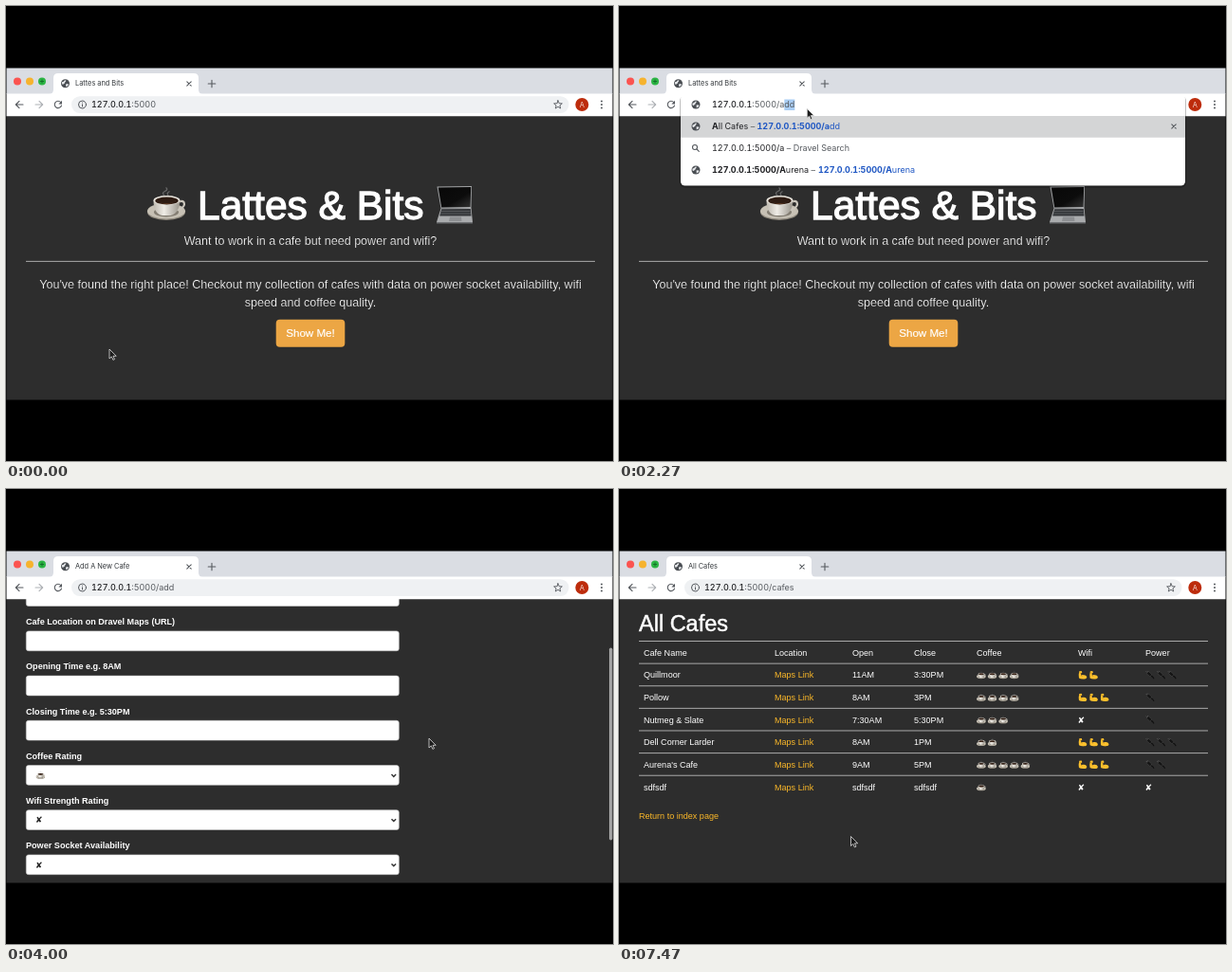
Recreate the animation shown at these times as an HTML page. Size 640 by 480 pixels, loop 8 s.

```html
<!DOCTYPE html>
<html lang="en">
<head>
<meta charset="utf-8">
<title>Cafe finder</title>
<style>
  html, body { margin: 0; width: 100%; height: 100%; overflow: hidden; background: #000; }
  svg { display: block; }
  text { font-family: "Liberation Sans", Arial, sans-serif; font-size: 9.05px; fill: #fff; }
  .ui text { font-family: Inter, "Noto Sans", sans-serif; font-size: 9px; font-variant-numeric: tabular-nums; fill: #202124; }
  .ui .tab { font-size: 7.4px; fill: #33373b; }
  .ui .dim { fill: #565a5f; }
  .ui .url { fill: #1f57c3; }
  .ui .b { font-weight: 700; }
  .icon { fill: none; stroke: #55595e; stroke-width: 1.1; stroke-linecap: round; stroke-linejoin: round; }
  .title { font-size: 42.5px; stroke: #fff; stroke-width: 1.3px; }
  .head { font-size: 23.9px; stroke: #fff; stroke-width: .2px; }
  .lead { font-size: 12.56px; text-anchor: middle; stroke: #2d2d2d; stroke-width: .2px; }
  .label { font-weight: 700; font-size: 9.1px; }
  .gold { fill: #fbb829; }
  .cross { font-family: "DejaVu Sans", sans-serif; font-size: 9px; }
</style>
</head>
<body>
<svg id="stage" width="640" height="480" viewBox="0 0 640 480">
  <defs>
    <clipPath id="view"><rect y="116" width="640" height="299.5"/></clipPath>
    <linearGradient id="screen" x1="0" y1="0" x2="1" y2="1">
      <stop offset="0" stop-color="#080808"/><stop offset=".6" stop-color="#0c0c0c"/><stop offset="1" stop-color="#333"/>
    </linearGradient>
    <linearGradient id="china" x1="0" x2="1">
      <stop offset="0" stop-color="#bdb8ae"/><stop offset=".4" stop-color="#efece6"/><stop offset="1" stop-color="#98938a"/>
    </linearGradient>
    <symbol id="cup" viewBox="0 0 42 38">
      <path d="M19 10q-4-3 0-5t1-4M23 10q-3-3 1-5" fill="none" stroke="#8b8b8b" stroke-width="1.3" opacity=".6"/>
      <ellipse cx="20.500" cy="27" rx="20" ry="8.500" fill="#8d877c"/>
      <ellipse cx="20.500" cy="25.800" rx="20" ry="8.300" fill="#c6c0b4"/>
      <ellipse cx="20.500" cy="27" rx="13" ry="5" fill="#837d72"/>
      <path d="M33.500 16q6-2 6 2.500t-9 6.500" fill="none" stroke="#cbc6bc" stroke-width="2.200"/>
      <path d="M7 14.500q0 14 9 16h9q9-2 10-16z" fill="url(#china)"/>
      <ellipse cx="21" cy="14.500" rx="14" ry="5" fill="#e8e4dc"/>
      <ellipse cx="21" cy="15" rx="12.200" ry="3.900" fill="#2e1c13"/>
      <path d="M14 17.300q7 2 14 0-7 .6-14 0z" fill="#6b432a"/>
    </symbol>
    <symbol id="arm" viewBox="0 0 10 10">
      <path d="M1 .8 3.600.6 4.300 2.300 2.900 3.300 3.200 5.500Q4.600 4.600 5.700 5 8.600 4.600 9.500 7 9.800 9.400 6.500 9.500 2.500 9.700.7 8.400 0 5 1 .8z" fill="#fbc02d"/>
      <path d="M3.200 5.500 4.200 6.600M1.200 2.300 2.900 3.300" stroke="#b9770e" stroke-width=".6" fill="none"/>
    </symbol>
    <symbol id="plug" viewBox="0 0 10 10">
      <path d="M1 3.300 3.300 1 6.700 4.200 6.300 6 4.500 6.500z" fill="#151515" stroke="#505050" stroke-width=".5"/>
      <path d="M1.500 2 .5 1M2.700 1.200 2 .4" stroke="#777" stroke-width=".7"/>
      <path d="M6 6Q8 6.500 9.300 9.300" fill="none" stroke="#101010" stroke-width="1.200"/>
    </symbol>
    <g id="globe">
      <circle r="4.500" fill="#4a4e53"/>
      <path d="M-3.500-1.500Q-1.500-1.800-.8-3.300L.8-3.600Q.6-1.800-.4-1.200-.2.200-1.800.4-2.600 1.500-3.600.2zM.5.600 2.600.2 3.500 1.200Q2.500 3 .8 3.400z" fill="#e4e6e9"/>
    </g>
    <path id="x" class="icon" d="M-2.200-2.200 2.200 2.200M2.200-2.200-2.200 2.200"/>
  </defs>

  <rect width="640" height="480"/>
  <rect x=".5" y="116" width="639" height="299.500" fill="#2d2d2d"/>

  <g clip-path="url(#view)">
    <g id="home">
      <use href="#cup" x="148.500" y="190.500" width="42" height="38"/>
      <text class="title" x="202" y="225">Lattes &amp; Bits</text>
      <g>
        <path d="M454.500 190.500 491 190 490.500 213 458.500 213.500z" fill="#a3a5a7"/>
        <path d="M455.700 191.500 490.200 191.100 489.600 212 459.200 212.500z" fill="url(#screen)"/>
        <path d="M458.500 213.500 490.500 213 492 228 454 228z" fill="#a9abad"/>
        <path d="M459.200 214.300 489.800 213.900 490.500 221.500 457.200 221.500z" fill="#333538"/>
        <path d="M459 216.500H489.500M458.300 219H490" stroke="#77797c" stroke-width=".5"/>
        <path d="M468 222.500H480L480.500 227H467z" fill="#8d8f92"/>
        <path d="M454 228H492V229.500H454z" fill="#6c6e71"/>
      </g>
      <text class="lead" x="321" y="252">Want to work in a cafe but need power and wifi?</text>
      <path d="M21 269.400H621" stroke="#c8c8c8" stroke-width=".8"/>
      <text class="lead" x="321" y="297.500">You've found the right place! Checkout my collection of cafes with data on power socket availability, wifi</text>
      <text class="lead" x="321" y="316.500">speed and coffee quality.</text>
      <rect x="284.700" y="330.800" width="72.600" height="29" rx="4" fill="#eca644"/>
      <text x="321" y="349" text-anchor="middle" style="font-size:11.6px;stroke:#fff;stroke-width:.2px">Show Me!</text>
    </g>
    <g id="add"></g>
    <g id="cafes"></g>
    <rect id="thumb" x="636" width="3.400" height="203" rx="1.700" fill="#a3a3a3"/>
  </g>

  <g class="ui">
    <path d="M.5 65.600H639.500V93H.5z" fill="#dadde3"/>
    <path d="M.5 92.500H639.500V116.300H.5z" fill="#fff"/>
    <circle cx="12" cy="79.500" r="4" fill="#fb5450"/>
    <circle cx="25" cy="79.500" r="4" fill="#f6b32e"/>
    <circle cx="38" cy="79.500" r="4" fill="#2cb544"/>
    <path d="M36 79.500H40M38 77.500V81.500" stroke="#14702a"/>
    <path d="M45 93Q50 93 50 88V76Q50 71 55 71H198Q203 71 203 76V88Q203 93 208 93z" fill="#fff"/>
    <use id="favicon" href="#globe" x="62.500" y="81.800"/>
    <text id="tab" class="tab" x="73" y="84.300"></text>
    <use href="#x" x="193" y="82"/>
    <path class="icon" d="M217 78.200V85.800M213.200 82H220.800"/>
    <path class="icon" d="M18 104H10.500M14 100.300 10.300 104 14 107.700"/>
    <path class="icon" style="stroke:#aeb1b5" d="M31 104H38.500M35 100.300 38.700 104 35 107.700"/>
    <g id="reload">
      <path class="icon" d="M57.800 101.500A3.700 3.700 0 1 0 58.500 105"/>
      <path d="M59 99.800V103.400H55.400z" fill="#55595e"/>
    </g>
    <use id="stop" href="#x" transform="translate(55 104) scale(1.500)"/>
    <rect id="pill" x="69" y="95.200" width="524.500" height="17.800" rx="8.900" stroke-width="1.400"/>
    <g class="icon" id="info" style="stroke-width:1">
      <circle cx="80.500" cy="104" r="4"/><path d="M80.500 103.800V106M80.500 101.900V102"/>
    </g>
    <path id="star" class="icon" style="stroke-width:.9" d=""/>
    <circle cx="607.300" cy="104" r="7" fill="#bd2c0c"/>
    <text x="607.300" y="106.800" text-anchor="middle" style="font-size:7.5px;fill:#f3d9d2">A</text>
    <g fill="#55595e"><circle cx="628" cy="100.500" r="1"/><circle cx="628" cy="104" r="1"/><circle cx="628" cy="107.500" r="1"/></g>

    <g id="drop">
      <rect x="64" y="95" width="534" height="96.500" rx="5" opacity=".25"/>
      <rect x="65" y="93.500" width="532" height="96" rx="4.500" fill="#fff"/>
      <path d="M65 116H597V138.700H65z" fill="#d4d5d6"/>
      <use href="#globe" x="81" y="104"/><use href="#globe" x="81" y="127"/><use href="#globe" x="81" y="173"/>
      <g class="icon"><circle cx="80" cy="149" r="2.500"/><path d="M82 151 84.300 153.300"/></g>
      <use href="#x" x="585" y="127"/>
      <text x="98" y="130.300"><tspan class="b">A</tspan>ll Cafes<tspan class="dim"> –</tspan></text>
      <text class="url" x="145.500" y="130.300"><tspan class="b">127.0.0.1:5000/a</tspan>dd</text>
      <text x="98" y="153.300"><tspan id="query"></tspan><tspan class="dim"> – Dravel Search</tspan></text>
      <text x="98" y="176.300"><tspan class="b">127.0.0.1:5000/A</tspan>urena<tspan class="dim"> –</tspan></text>
      <text class="url" x="210" y="176.300"><tspan class="b">127.0.0.1:5000/A</tspan>urena</text>
    </g>
    <rect id="mark" y="98.500" height="11.500" fill="#a9cdf4"/>
    <text id="address" y="107.300"><tspan style="font-weight:500">127.0.0.1</tspan><tspan id="path" class="dim"></tspan></text>
    <rect id="caret" y="98.500" width="1" height="11.500"/>
  </g>

  <g id="cursor" stroke-linejoin="round">
    <path id="arrow" d="M0 0V10L2.300 7.900 3.900 11.400 5.500 10.700 4 7.300H7.200z" fill="#1c1c1c" stroke="#dcdcdc" stroke-width=".8"/>
    <g id="beam" fill="none">
      <path d="M-2-5Q0-5 0-3.500 0-5 2-5M0-4V4M-2 5Q0 5 0 3.500 0 5 2 5" stroke="#fff" stroke-width="1.800" opacity=".6"/>
      <path d="M-2-5Q0-5 0-3.500 0-5 2-5M0-4V4M-2 5Q0 5 0 3.500 0 5 2 5" stroke="#222" stroke-width=".9"/>
    </g>
    <path id="hand" d="M0 1Q1-.3 2 1V4.300L6 5Q7.300 5.300 7 7L6 10.500H1.700L-1.300 7Q-1.500 5.600 0 6z" fill="#f2f2f2" stroke="#222" stroke-width=".7"/>
  </g>
</svg>

<script>
const STEP = 1000 / 15, LOOP = 8000;
const $ = id => document.getElementById(id);
const show = (id, on) => { $(id).style.display = on ? '' : 'none'; };
const text = (x, y, s, cls = '', extra = '') => `<text x="${x}" y="${y}" class="${cls}" ${extra}>${s}</text>`;
const use = (id, x, y, w, h) => `<use href="#${id}" x="${x}" y="${y}" width="${w}" height="${h}"/>`;

function buildForm() {
  const labels = ['Cafe name', 'Cafe Location on Dravel Maps (URL)', 'Opening Time e.g. 8AM',
    'Closing Time e.g. 5:30PM', 'Coffee Rating', 'Wifi Strength Rating', 'Power Socket Availability'];
  const box = (y, w) => `<rect x="21.300" y="${y}" width="${w}" height="20.800" rx="2.500" fill="#fff" stroke="#ccc" stroke-width=".6"/>`;
  let out = text(21, 150, 'Add a new cafe into the database', 'head');
  labels.forEach((s, i) => {
    const y = 47.2 * i;
    out += text(21, 170 + y, s, 'label') + box(176.7 + y, 393);
    if (i > 3) out += `<path d="M406.500 ${186.2 + y}l2.300 2.400 2.300-2.400" fill="none" stroke="#333" stroke-width="1.400"/>`;
    if (i === 4) out += use('cup', 31.500, 182.500 + y, 10, 9);
    if (i > 4) out += text(31, 190.4 + y, '✘', 'cross', 'style="fill:#222"');
  });
  out += box(491.2, 45) + text(29.300, 505.2, 'Submit', '', 'style="fill:#222"');
  out += text(21, 547.7, 'See all cafes', '', 'id="link"');
  $('add').innerHTML = out;
}

function buildTable() {
  const cols = [26, 164, 246, 311, 377, 484, 555];
  const rows = [
    ['Quillmoor', '11AM', '3:30PM', 4, 2, 3],
    ['Pollow', '8AM', '3PM', 4, 3, 1],
    ['Nutmeg &amp; Slate', '7:30AM', '5:30PM', 3, 0, 1],
    ['Dell Corner Larder', '8AM', '1PM', 2, 3, 3],
    ["Aurena's Cafe", '9AM', '5PM', 5, 3, 2],
    ['sdfsdf', 'sdfsdf', 'sdfsdf', 1, 0, 0]];
  const icons = (id, n, x, y) => n
    ? Array.from({ length: n }, (_, i) => use(id, x + 11.6 * i, y - 7.800, 10, 9.400)).join('')
    : text(x - .5, y, '✘', 'cross');
  let out = text(21, 150, 'All Cafes', 'head', 'style="font-size:23.5px;stroke-width:.5px"');
  ['Cafe Name', 'Location', 'Open', 'Close', 'Coffee', 'Wifi', 'Power'].forEach((s, i) => { out += text(cols[i], 175.8, s); });
  for (let i = 0; i < 7; i++) out += `<path d="M21 ${160.5 + 23.62 * i}H621" stroke="#c9c9c9" stroke-width=".8"/>`;
  rows.forEach(([name, open, close, coffee, wifi, power], i) => {
    const y = 199.3 + 23.64 * i;
    out += text(cols[0], y, name) + text(cols[1], y, 'Maps Link', 'gold') + text(cols[2], y, open) + text(cols[3], y, close)
      + icons('cup', coffee, cols[4], y) + icons('arm', wifi, cols[5], y) + icons('plug', power, cols[6], y);
  });
  $('cafes').innerHTML = out + text(21, 348, 'Return to index page', 'gold');
}

function starPath() {
  const pts = Array.from({ length: 10 }, (_, i) => {
    const r = i % 2 ? 2 : 4.6, a = Math.PI * (i / 5 - .5);
    return (582 + r * Math.cos(a)).toFixed(2) + ' ' + (104.3 + r * Math.sin(a)).toFixed(2);
  });
  return 'M' + pts.join('L') + 'z';
}

// time, x, y
const moves = [
  [0, 109, 362], [67, 130, 300], [133, 172, 180], [200, 189, 123], [400, 189, 123],
  [667, 196, 110], [867, 198.3, 108.3], [2600, 198.3, 108.3], [2867, 200.5, 110.5], [3533, 200.5, 110.5],
  [3600, 225, 122], [3733, 340, 205], [3867, 430, 258], [4000, 446, 263], [4533, 446, 263],
  [4800, 330, 318], [5067, 150, 382], [5400, 39, 405], [5600, 37, 406], [5733, 40, 405],
  [6200, 40, 405], [6267, 120, 402], [6400, 380, 388], [6533, 507, 376], [7200, 507, 376],
  [7267, 450, 372], [7400, 268, 367.5], [7467, 244.5, 366.5]];
const scrolls = [[3733, 0], [4000, 74], [4133, 112], [4333, 139]];
const fades = [[3733, 0], [3800, 1], [4667, 1], [4933, 0]];
// time, typed path, completion
const typing = [[2133, '/', ''], [2267, '/a', 'dd'], [2333, '/ad', 'd'], [2467, '/add', '']];

function at(keys, t) {
  const i = keys.findIndex(k => k[0] > t);
  if (i === 0) return keys[0].slice(1);
  if (i < 0) return keys[keys.length - 1].slice(1);
  const a = keys[i - 1], b = keys[i], k = (t - a[0]) / (b[0] - a[0]);
  return a.slice(1).map((v, n) => v + (b[n + 1] - v) * k);
}
const within = (t, a, b) => t >= a && t < b;

function draw(time) {
  const t = Math.round(Math.floor((time + 4) / STEP) * STEP);
  const page = t < 2800 ? 'home' : t < 6333 ? 'add' : 'cafes';
  for (const id of ['home', 'add', 'cafes']) show(id, id === page);
  $('tab').textContent = { home: 'Lattes and Bits', add: 'Add A New Cafe', cafes: 'All Cafes' }[page];

  const loading = within(t, 2600, 2867) || within(t, 6200, 6533);
  show('favicon', !loading);
  show('reload', !loading);
  show('stop', loading);

  const [scroll] = at(scrolls, t);
  $('add').setAttribute('transform', `translate(0 ${-scroll})`);
  $('thumb').setAttribute('y', 117 + scroll * 300 / 439);
  $('thumb').setAttribute('opacity', at(fades, t)[0]);

  const open = within(t, 2133, 2600), focus = within(t, 1000, 2133), all = within(t, 1000, 1200);
  const [, typed, tail] = typing.filter(k => k[0] <= t).pop() || [0, '', ''];
  const path = open ? typed + tail : t < 2133 ? '' : page === 'cafes' ? '/cafes' : '/add';
  const left = open ? 98 : 90;
  show('drop', open);
  show('info', !open);
  show('star', !open);
  $('pill').setAttribute('fill', focus ? '#fff' : '#eff1f3');
  $('pill').setAttribute('stroke', focus ? '#8ab5f3' : 'none');
  $('path').textContent = ':5000' + path;
  $('query').textContent = '127.0.0.1:5000' + typed;
  $('address').setAttribute('x', left);

  const full = $('address').getComputedTextLength();
  const start = all ? 0 : $('address').getSubStringLength(0, 14 + typed.length);
  show('mark', all || (open && tail));
  $('mark').setAttribute('x', left + start);
  $('mark').setAttribute('width', Math.max(0, full - start));
  show('caret', within(t, 1200, 1667) || (open && !tail));
  $('caret').setAttribute('x', left + full);

  const [x, y] = at(moves, t);
  const hover = within(t, 5333, 6260);
  const beam = y < 114 && !open;
  $('cursor').setAttribute('transform', `translate(${x} ${y})`);
  show('hand', hover);
  show('beam', beam);
  show('arrow', !hover && !beam);
  $('link').style.fill = hover ? '#23527c' : '#337ab7';
  $('link').style.textDecoration = hover ? 'underline' : 'none';
}

buildForm();
buildTable();
$('star').setAttribute('d', starPath());
const begin = performance.now();
function tick() {
  draw((performance.now() - begin) % LOOP);
  requestAnimationFrame(tick);
}
tick();
</script>
</body>
</html>
```
